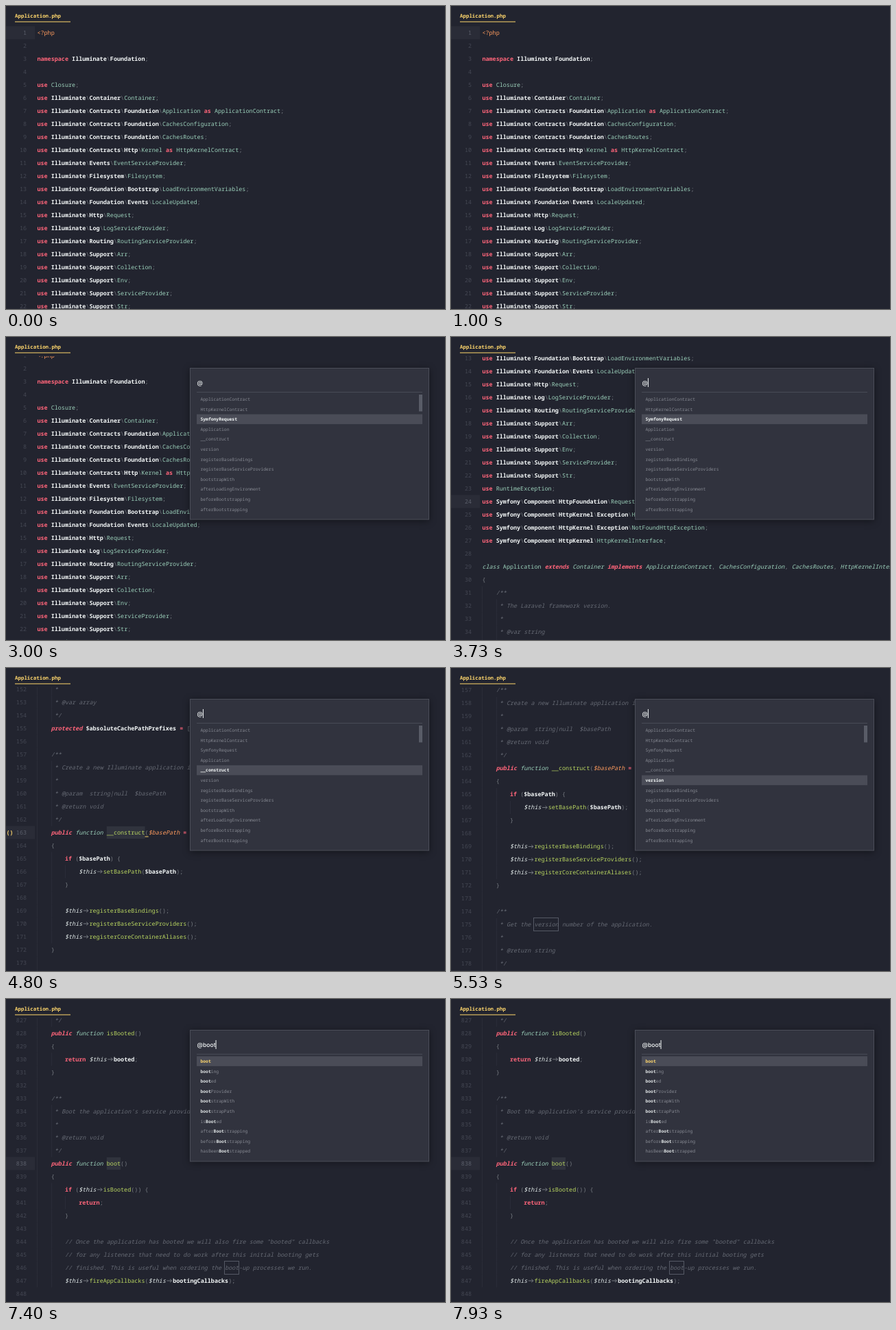
Recreate the animation shown at these times as an HTML page with a canvas. Size 640 px wide and 442 px high, loop 8 s.

```html
<!DOCTYPE html>
<html lang="en">
<head>
<meta charset="utf-8">
<title>Application.php</title>
<style>
html, body { margin: 0; width: 100%; height: 100%; overflow: hidden; background: #22242f; }
canvas { display: block; }
</style>
</head>
<body>
<canvas id="stage" width="640" height="442"></canvas>
<script>
const ctx = document.getElementById('stage').getContext('2d');
const LOOP = 8000, ROW = 19, COL = 5.07, LEFT = 45.4, TOP = 39;
const RED = '#ff657a', ORANGE = '#ff9b5e', YELLOW = '#ffd76d', LIME = '#bad761', MINT = '#9cd1bb',
  PURPLE = '#c39ac9', WHITE = '#f4f8f8', GRAY = '#767b81', COMMENT = '#666a74', BACK = '#22242f';

// ---- Document ----
const methodDoc = (text, type, name) =>
  ['/**', ' * ' + text, ' *', ' * @return ' + type, ' */', `public function ${name}()`];
const indent = rows => rows.map(row => row && '    ' + row);

const lines = String.raw`<?php

namespace Illuminate\Foundation;

use Closure;
use Illuminate\Container\Container;
use Illuminate\Contracts\Foundation\Application as ApplicationContract;
use Illuminate\Contracts\Foundation\CachesConfiguration;
use Illuminate\Contracts\Foundation\CachesRoutes;
use Illuminate\Contracts\Http\Kernel as HttpKernelContract;
use Illuminate\Events\EventServiceProvider;
use Illuminate\Filesystem\Filesystem;
use Illuminate\Foundation\Bootstrap\LoadEnvironmentVariables;
use Illuminate\Foundation\Events\LocaleUpdated;
use Illuminate\Http\Request;
use Illuminate\Log\LogServiceProvider;
use Illuminate\Routing\RoutingServiceProvider;
use Illuminate\Support\Arr;
use Illuminate\Support\Collection;
use Illuminate\Support\Env;
use Illuminate\Support\ServiceProvider;
use Illuminate\Support\Str;
use RuntimeException;
use Symfony\Component\HttpFoundation\Request as SymfonyRequest;
use Symfony\Component\HttpKernel\Exception\HttpException;
use Symfony\Component\HttpKernel\Exception\NotFoundHttpException;
use Symfony\Component\HttpKernel\HttpKernelInterface;

class Application extends Container implements ApplicationContract, CachesConfiguration, CachesRoutes, HttpKernelInterface
{`.split('\n');

const property = (text, type, code) =>
  lines.push(...indent(['/**', ' * ' + text, ' *', ' * @var ' + type, ' */', code, '']));

property('The Laravel framework version.', 'string', "const VERSION = '8.0.0';");
const properties = `basePath hasBeenBootstrapped booted bootingCallbacks bootedCallbacks terminatingCallbacks
  serviceProviders loadedProviders deferredServices appPath databasePath storagePath environmentPath
  environmentFile isRunningInConsole namespace`.split(/\s+/);
for (const name of properties) {
  const words = name.replace(/[A-Z]/g, c => ' ' + c.toLowerCase());
  property(`The ${words} of the application.`, /s$/.test(name) ? 'array' : 'string', `protected $${name};`);
}
property('The prefixes of absolute cache paths.', 'array', "protected $absoluteCachePathPrefixes = ['/'];");

lines.push(...indent(`/**
 * Create a new Illuminate application instance.
 *
 * @param  string|null  $basePath
 * @return void
 */
public function __construct($basePath = null)
{
    if ($basePath) {
        $this->setBasePath($basePath);
    }

    $this->registerBaseBindings();
    $this->registerBaseServiceProviders();
    $this->registerCoreContainerAliases();
}
`.split('\n')));
lines.push(...indent([
  ...methodDoc('Get the version number of the application.', 'string', 'version'),
  '{', '    return static::VERSION;', '}', '',
  ...methodDoc('Register the basic bindings into the container.', 'void', 'registerBaseBindings')
    .map(row => row.replace('public', 'protected')),
  ...`{
    static::setInstance($this);

    $this->instance('app', $this);

    $this->instance(Container::class, $this);
    $this->singleton(Mix::class);

    $this->singleton(PackageManifest::class, function () {
        return new PackageManifest($this->basePath());
    });
}
`.split('\n')]));
for (let i = 0; lines.length < 822; i++) {
  const name = properties[i % properties.length];
  lines.push(...indent([...methodDoc('Get the value for the application.', 'string', name),
    '{', `    return $this->${name};`, '}', '']));
}
lines.push(...indent([
  ...methodDoc('Determine if the application has booted.', 'bool', 'isBooted'),
  '{', '    return $this->booted;', '}', '',
  ...methodDoc("Boot the application's service providers.", 'void', 'boot'),
  ...`{
    if ($this->isBooted()) {
        return;
    }

    // Once the application has booted we will also fire some "booted" callbacks
    // for any listeners that need to do work after this initial booting gets
    // finished. This is useful when ordering the boot-up processes we run.
    $this->fireAppCallbacks($this->bootingCallbacks);
`.split('\n')]));

// ---- Syntax colours: pattern, colour, style ----
const B = 'bold ', I = 'italic ';
const rules = [
  [/\s+/y],
  [/<\?php/y, ORANGE],
  [/\$this/y, '#dfe7e6', I],
  [/\$\w+(?= = null)/y, ORANGE, I],
  [/\$\w+/y, WHITE, B],
  [/'[^']*'/y, YELLOW],
  [/->/y, GRAY, 'arrow'],
  [/(public|protected|extends|implements)\b/y, RED, I + B],
  [/(use|namespace|as|return|if|new|const)\b|=/y, RED, B],
  [/(function|class)\b/y, MINT, I],
  [/static\b/y, '#dfe7e6', I],
  [/null\b/y, PURPLE],
  [/\w+(?=\\)|(?<=namespace.*)\w+|[A-Z]{3,}\b/y, WHITE, B],
  [/\w+(?=\()/y, LIME],
  [/(?<=->)\w+/y, WHITE, B],
  [/(?<=class .* .*)\w+/y, MINT, I],
  [/\w+/y, MINT],
  [/./y, GRAY]
];

function tokenize(line) {
  if (/^\s*(\*|\/)/.test(line))
    return [...line.matchAll(/\S+/g)].map(m => [m.index, m[0], COMMENT, I]);
  const tokens = [];
  for (let at = 0; at < line.length;) {
    for (const [pattern, color, style = ''] of rules) {
      pattern.lastIndex = at;
      const match = pattern.exec(line);
      if (!match) continue;
      if (color) tokens.push([at, match[0], color, style]);
      at += match[0].length;
      break;
    }
  }
  return tokens;
}

// ---- Timeline ----
const symbols = `ApplicationContract HttpKernelContract SymfonyRequest Application __construct version
  registerBaseBindings registerBaseServiceProviders bootstrapWith afterLoadingEnvironment
  beforeBootstrapping afterBootstrapping`.split(/\s+/);
const matches = `boot booting booted bootProvider bootstrapWith bootstrapPath isBooted afterBootstrapping
  beforeBootstrapping hasBeenBootstrapped`.split(/\s+/);

const steps = [
  [0, 1, -1], [1550, 7, 0], [2560, 10, 1], [2950, 24, 2], [4270, 29, 3], [4430, 163, 4],
  [5400, 179, 5], [6130, 189, 6],
  [6900, 838, 0, 'b'], [7030, 838, 0, 'bo'], [7150, 838, 0, 'boo'], [7270, 838, 0, 'boot']
].map(([time, line, selected, query = '']) => ({ time, line, selected, query }));

// A line outside the view is scrolled to the centre.
let lastScroll = 0;
for (const step of steps) {
  const y = TOP + (step.line - 1) * ROW;
  const visible = y - lastScroll > 38 && y - lastScroll < 436;
  const scroll = visible ? lastScroll : y - 240;
  step.shift = scroll - lastScroll;
  lastScroll = scroll;
}

const clamp = v => Math.min(1, Math.max(0, v));
const ease = v => (1 - Math.cos(Math.PI * clamp(v))) / 2;

// ---- Drawing ----
function rect(color, x, y, w, h) {
  ctx.fillStyle = color;
  ctx.fillRect(x, y, w, h);
}

function text(string, x, y, color, size = 8.45, style = '500 ', family = '"Noto Sans Mono", monospace') {
  ctx.font = `${style}${size}px ${family}`;
  ctx.fillStyle = color;
  ctx.fillText(string, x, y);
}

function arrow(x, y) {
  ctx.strokeStyle = GRAY;
  ctx.beginPath();
  ctx.moveTo(x + 1.5, y);
  ctx.lineTo(x + 8.5, y);
  ctx.moveTo(x + 6, y - 2.3);
  ctx.lineTo(x + 8.7, y);
  ctx.lineTo(x + 6, y + 2.3);
  ctx.stroke();
}

const indentOf = line => line ? line.search(/\S/) : 0;

function drawLine(number, y, step, word) {
  const line = lines[number - 1], current = number === step.line;
  if (current) rect('#2a2c37', 0, y - 9.5, 42, ROW);
  ctx.textAlign = 'right';
  text(number, 30, y + 3, current ? '#5b5f6b' : '#444753');
  ctx.textAlign = 'left';

  const depth = line ? indentOf(line) : Math.min(indentOf(lines[number - 2]), indentOf(lines[number]));
  for (let col = 0; col < depth; col += 4)
    rect('#2a2c38', Math.round(LEFT + col * COL), y - 9.5, 1, ROW);

  if (word) {
    for (const match of line.matchAll(new RegExp(`\\b${word}\\b`, 'g'))) {
      const x = LEFT + match.index * COL, w = word.length * COL;
      if (current) {
        rect('#30333d', x, y - 9, w, 18);
      } else {
        ctx.strokeStyle = '#555965';
        ctx.strokeRect(Math.round(x) - .5, Math.round(y) - 9.5, Math.round(w) + 1, ROW);
      }
    }
    if (current && !step.query && line.includes(word + '(')) {
      for (const bracket of '()') rect(YELLOW, LEFT + line.indexOf(bracket) * COL, y + 5.5, COL, 1);
      text('()', .5, y + 3, YELLOW, 8.45, B);
    }
  }
  for (const [col, string, color, style] of tokenize(line)) {
    const x = LEFT + col * COL;
    if (style === 'arrow') arrow(x, y);
    else text(string, x, y + 3, color, 8.45, style.includes(B) ? style : style + '500 ');
  }
}

function drawPalette(t, step) {
  const { query, selected } = step, items = query ? matches : symbols;
  const height = 61 + (items.length - 1) * 14.6;
  ctx.shadowColor = 'rgba(0,0,0,.4)';
  ctx.shadowBlur = 10;
  ctx.shadowOffsetY = 2;
  rect('#4b4e59', 268, 45, 349, height);
  ctx.shadowColor = 'transparent';
  rect('#31333e', 269, 46, 347, height - 2);

  text('@' + query, 278.5, 70, WHITE, 8.6, '500 ', 'Inter, sans-serif');
  const caretX = 278.5 + ctx.measureText('@' + query).width;
  const typing = query && t < 7800;
  ctx.globalAlpha = typing ? 1 : clamp(.5 - 3 * Math.sin((t + 40) / 500 * Math.PI));
  rect(WHITE, caretX, 60, 1, 13);
  ctx.globalAlpha = 1;
  rect('#484b56', 278, 80, 329, 1);

  items.forEach((item, i) => {
    const y = 90.7 + i * 14.6, active = i === selected;
    if (active) rect('#4a4c57', 278, y - 7.2, 329, 14.4);
    const start = item.toLowerCase().indexOf(query), end = start + query.length;
    const part = (from, to, color, style) =>
      text(item.slice(from, to), 283.4 + from * 3.83, y + 2.3, color, 6.38, style);
    const plain = active ? [WHITE, B] : ['#888b94', '500 '];
    part(0, start, ...plain);
    part(start, end, active ? YELLOW : '#e0e5e6', B);
    part(end, item.length, ...plain);
  });

  if (!query) {
    ctx.globalAlpha = clamp((760 - t + step.time) / 80);
    rect('#595c67', 602, 84, 5, 24.5);
    ctx.globalAlpha = 1;
  }
}

function draw() {
  const t = performance.now() % LOOP;
  const step = steps.findLast(s => t >= s.time);
  const scroll = steps.reduce((sum, s) => sum + s.shift * ease((t - s.time) / 350), 0);
  const word = step.selected < 0 ? '' : (step.query ? matches : symbols)[step.selected];

  ctx.textRendering = 'geometricPrecision';
  ctx.lineWidth = 1;
  rect(BACK, 0, 0, 640, 442);
  const first = Math.max(1, Math.floor(scroll / ROW));
  for (let n = first; n <= Math.min(lines.length, first + 25); n++)
    drawLine(n, TOP + (n - 1) * ROW - scroll, step, word);

  rect(BACK, 0, 0, 640, 28);
  text('Application.php', 13, 16.7, YELLOW, 7.45, B);
  rect(YELLOW, 13, 22.5, 81, 1);
  if (word) drawPalette(t, step);
  requestAnimationFrame(draw);
}
draw();
</script>
</body>
</html>
```
